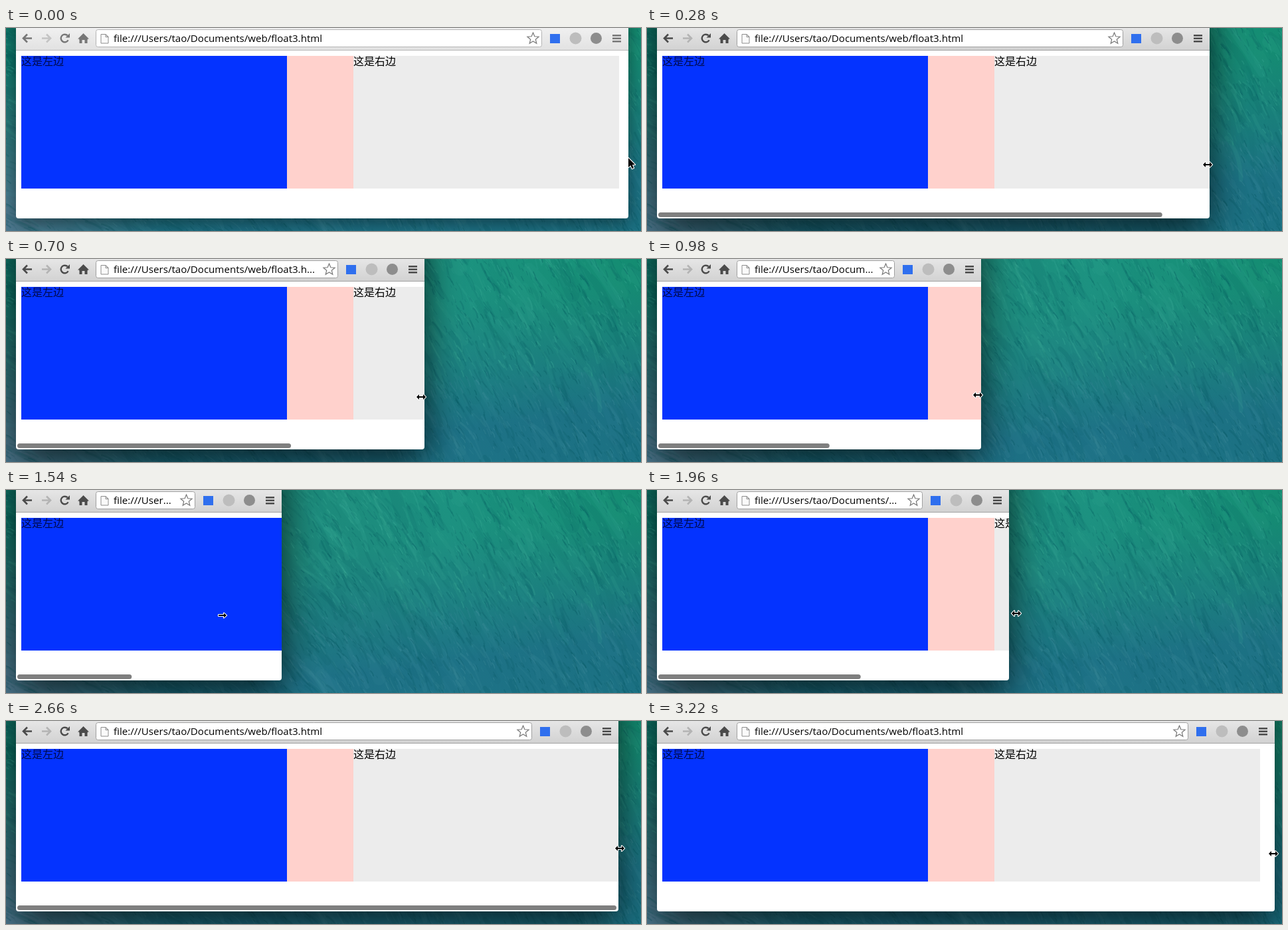
Recreate the animation shown at these times as an HTML page with a canvas. Size 956 by 306 pixels, loop 3360 ms.

```html
<!DOCTYPE html>
<html lang="zh">
<head>
<meta charset="utf-8">
<title>Resizing a browser window</title>
<style>
html, body { margin: 0; width: 100%; height: 100%; overflow: hidden; background: #1b7a72; }
canvas { display: block; }
</style>
</head>
<body>
<canvas id="stage" width="956" height="306"></canvas>
<script>
const W = 956, H = 306, STEP = 140, STEPS = 24;
const LEFT = 15, BOTTOM = 287, MIN_EDGE = 415;
const URL_TEXT = 'file:///Users/tao/Documents/web/float3.html';
const ctx = document.getElementById('stage').getContext('2d');

// The drag: right window edge and pointer, linear between these points.
const drag = [
  { at: 0, edge: 937, x: 937, y: 196 },
  { at: 1, edge: 937, x: 935, y: 202 },
  { at: 3, edge: 757, x: 752, y: 210 },
  { at: 7, edge: 503, x: 498, y: 205 },
  { at: 8, edge: MIN_EDGE, x: 405, y: 198 },
  { at: 10, edge: MIN_EDGE, x: 272, y: 190 },
  { at: 12, edge: MIN_EDGE, x: 380, y: 188 },
  { at: 14, edge: 545, x: 556, y: 186 },
  { at: 16, edge: 743, x: 769, y: 185 },
  { at: 19, edge: 922, x: 924, y: 192 },
  { at: 22, edge: 945, x: 944, y: 200 },
  { at: 24, edge: 945, x: 942, y: 200 }
];

function poseAt(step) {
  const n = drag.findIndex(key => key.at > step);
  const a = drag[n - 1], b = drag[n];
  const k = (step - a.at) / (b.at - a.at);
  const mix = name => Math.round(a[name] + (b[name] - a[name]) * k);
  return { edge: mix('edge'), x: mix('x'), y: mix('y') };
}

function randomizer(seed) {
  return () => {
    seed = (seed * 1664525 + 1013904223) >>> 0;
    return seed / 4294967296;
  };
}

function fillAll(c, gradient, stops) {
  stops.forEach(([at, color]) => gradient.addColorStop(at, color));
  c.fillStyle = gradient;
  c.fillRect(0, 0, W, H);
}

function makeWater() {
  const layer = document.createElement('canvas');
  layer.width = W;
  layer.height = H;
  const c = layer.getContext('2d');
  const rnd = randomizer(77);
  fillAll(c, c.createLinearGradient(0, 0, W, 0),
    [[0, '#0c7265'], [0.45, '#1c8a79'], [0.7, '#1c9680'], [1, '#12906f']]);
  fillAll(c, c.createLinearGradient(270, 0, 310, H),
    [[0, 'rgba(30,105,132,0)'], [0.4, 'rgba(34,110,132,.15)'], [1, 'rgba(30,104,136,.78)']]);
  fillAll(c, c.createRadialGradient(0, 290, 10, 0, 290, 240),
    [[0, 'rgba(95,125,150,.75)'], [1, 'rgba(95,125,150,0)']]);

  function ripples(count, length, width, alpha) {
    c.lineCap = 'round';
    for (let i = 0; i < count; i++) {
      const x = rnd() * (W + 160) - 120, y = rnd() * (H + 160) - 120;
      const angle = 0.5 + 0.55 * Math.min(1, x / 600) + (rnd() - 0.5) * 0.4;
      const len = length * (0.4 + rnd());
      const dx = Math.cos(angle) * len, dy = Math.sin(angle) * len;
      const bend = (rnd() - 0.3) * len * 0.25;
      const tone = rnd() < 0.5 ? '0,84,92' : y > 170 ? '72,146,160' : '66,178,156';
      c.strokeStyle = `rgba(${tone},${alpha * (0.5 + rnd())})`;
      c.lineWidth = width * (0.5 + rnd());
      c.beginPath();
      c.moveTo(x, y);
      c.quadraticCurveTo(x + dx / 2 + bend, y + dy / 2 - bend, x + dx, y + dy);
      c.stroke();
    }
  }
  ripples(90, 150, 14, 0.08);
  ripples(500, 60, 5, 0.11);
  ripples(1500, 24, 2.2, 0.16);
  ripples(4500, 8, 1.1, 0.24);
  return layer;
}
const water = makeWater();

function rect(color, x, y, w, h) {
  ctx.fillStyle = color;
  ctx.fillRect(x, y, w, h);
}

function roundRect(x, y, w, h, r) {
  ctx.beginPath();
  ctx.roundRect(x, y, w, h, r);
}

function polygon(points) {
  ctx.beginPath();
  points.forEach(([x, y]) => ctx.lineTo(x, y));
  ctx.closePath();
}

function paint(fill, stroke, width = 1) {
  ctx.fillStyle = fill;
  ctx.strokeStyle = stroke;
  ctx.lineWidth = width;
  ctx.fill();
  ctx.stroke();
}

function text(string, x, y, color) {
  ctx.fillStyle = color;
  ctx.fillText(string, x, y);
}

function disc(color, x, y, r) {
  ctx.fillStyle = color;
  ctx.beginPath();
  ctx.arc(x, y, r, 0, Math.PI * 2);
  ctx.fill();
}

function navArrow(x, dir, color) {
  ctx.strokeStyle = color;
  ctx.lineWidth = 2.6;
  ctx.beginPath();
  ctx.moveTo(x + dir * 7, 15.5);
  ctx.lineTo(x - dir * 6, 15.5);
  ctx.moveTo(x, 9.5);
  ctx.lineTo(x - dir * 6, 15.5);
  ctx.lineTo(x, 21.5);
  ctx.stroke();
}

function reloadIcon(color) {
  ctx.strokeStyle = color;
  ctx.lineWidth = 2.4;
  ctx.beginPath();
  ctx.arc(88.5, 15.5, 5.8, 0.5, Math.PI * 1.75);
  ctx.stroke();
  ctx.fillStyle = color;
  polygon([[96, 8], [96, 14.5], [89.5, 14.5]]);
  ctx.fill();
}

function homeIcon(color) {
  ctx.fillStyle = color;
  polygon([[116.5, 8], [125, 16.5], [108, 16.5]]);
  ctx.fill();
  rect(color, 110.5, 16, 4, 7);
  rect(color, 118.5, 16, 4, 7);
  rect(color, 110.5, 16, 12, 2);
}

function pageIcon() {
  polygon([[143, 9.5], [150, 9.5], [154, 13.5], [154, 23], [143, 23]]);
  paint('#fafafa', '#8c8c8c');
  polygon([[150, 9.5], [150, 13.5], [154, 13.5]]);
  ctx.stroke();
}

function starIcon(x, y) {
  polygon(Array.from({ length: 10 }, (_, i) => {
    const r = i % 2 ? 4 : 9, a = i * Math.PI / 5 - Math.PI / 2;
    return [x + r * Math.cos(a), y + r * Math.sin(a)];
  }));
  paint('#fff', '#777', 1.2);
}

function elide(string, room) {
  if (ctx.measureText(string).width <= room) return string;
  while (string && ctx.measureText(string + '...').width > room) string = string.slice(0, -1);
  return string + '...';
}

function drawToolbar(edge, active) {
  const ink = active ? '#4b4b4b' : '#777';
  const shade = ctx.createLinearGradient(0, 0, 0, 33);
  shade.addColorStop(0, active ? '#e6e6e6' : '#f0f0f0');
  shade.addColorStop(1, active ? '#d2d2d2' : '#e2e2e2');
  rect(shade, LEFT, 0, edge - LEFT, 33);
  rect(active ? '#a2a2a2' : '#b8b8b8', LEFT, 33, edge - LEFT, 1);

  navArrow(32, 1, ink);
  navArrow(61, -1, active ? '#b4b4b4' : '#c4c4c4');
  reloadIcon(ink);
  homeIcon(ink);

  roundRect(135.5, 2.5, edge - 266, 26, 3);
  paint('#fff', active ? '#a0a0a0' : '#b4b4b4');
  pageIcon();
  starIcon(edge - 143.5, 16);
  ctx.font = '15.1px "Open Sans", "Noto Sans", sans-serif';
  text(elide(URL_TEXT, edge - 161 - 162), 162, 21, '#000');

  rect('#2f6fee', edge - 118, 9, 15, 14);
  disc('#bdbdbd', edge - 79.5, 15.5, 9);
  disc('#8d8d8d', edge - 48.5, 15.5, 8.5);
  for (let i = 0; i < 3; i++) rect(ink, edge - 24, 10 + i * 4.5, 13, 2.5);
}

function drawPage(edge) {
  rect('#0433ff', 23, 42, 400, 200);
  rect('#ffd1cc', 423, 42, 100, 200);
  rect('#ececec', 523, 42, 400, 200);
  ctx.font = '16px "Noto Sans CJK SC", "Noto Sans CJK", sans-serif';
  text('这是左边', 23, 56, '#000a48');
  text('这是右边', 523, 56, '#000');

  if (edge >= 923) return;
  const view = edge - LEFT;
  const content = 908 + Math.max(0, 743 - edge) * 0.035;
  roundRect(17, 278, (view - 4) * view / content, 7, 3.5);
  ctx.fillStyle = '#7f7f7f';
  ctx.fill();
}

function drawWindow(edge, active) {
  const outline = () => roundRect(LEFT, -60, edge - LEFT, BOTTOM + 60, 4);
  ctx.save();
  ctx.shadowColor = `rgba(0,0,0,${active ? 0.72 : 0.45})`;
  ctx.shadowBlur = active ? 56 : 26;
  ctx.shadowOffsetY = active ? 18 : 8;
  ctx.fillStyle = '#fff';
  outline();
  ctx.fill();
  ctx.restore();
  ctx.save();
  outline();
  ctx.clip();
  drawToolbar(edge, active);
  drawPage(edge);
  ctx.restore();
}

const pointers = {
  arrow: [[0, 0], [0, 14], [3.3, 11], [5.6, 16], [8, 15], [5.8, 10.2], [10, 10]],
  both: [[-7, 0], [-3, -4], [-3, -1], [3, -1], [3, -4], [7, 0],
    [3, 4], [3, 1], [-3, 1], [-3, 4]],
  right: [[-6, -1], [2, -1], [2, -3.5], [6, 0], [2, 3.5], [2, 1], [-6, 1]]
};

function drawPointer(x, y, kind) {
  ctx.save();
  ctx.translate(x, y);
  polygon(pointers[kind]);
  ctx.lineJoin = 'round';
  paint('#000', '#fff', 2.2);
  ctx.fill();
  ctx.restore();
}

function draw() {
  const step = Math.floor(performance.now() / STEP) % STEPS;
  const { edge, x, y } = poseAt(step);
  const active = step > 0;
  const kind = !active ? 'arrow' : edge === MIN_EDGE ? 'right' : 'both';
  ctx.drawImage(water, 0, 0);
  drawWindow(edge, active);
  drawPointer(x, y, kind);
  requestAnimationFrame(draw);
}
draw();
</script>
</body>
</html>
```
